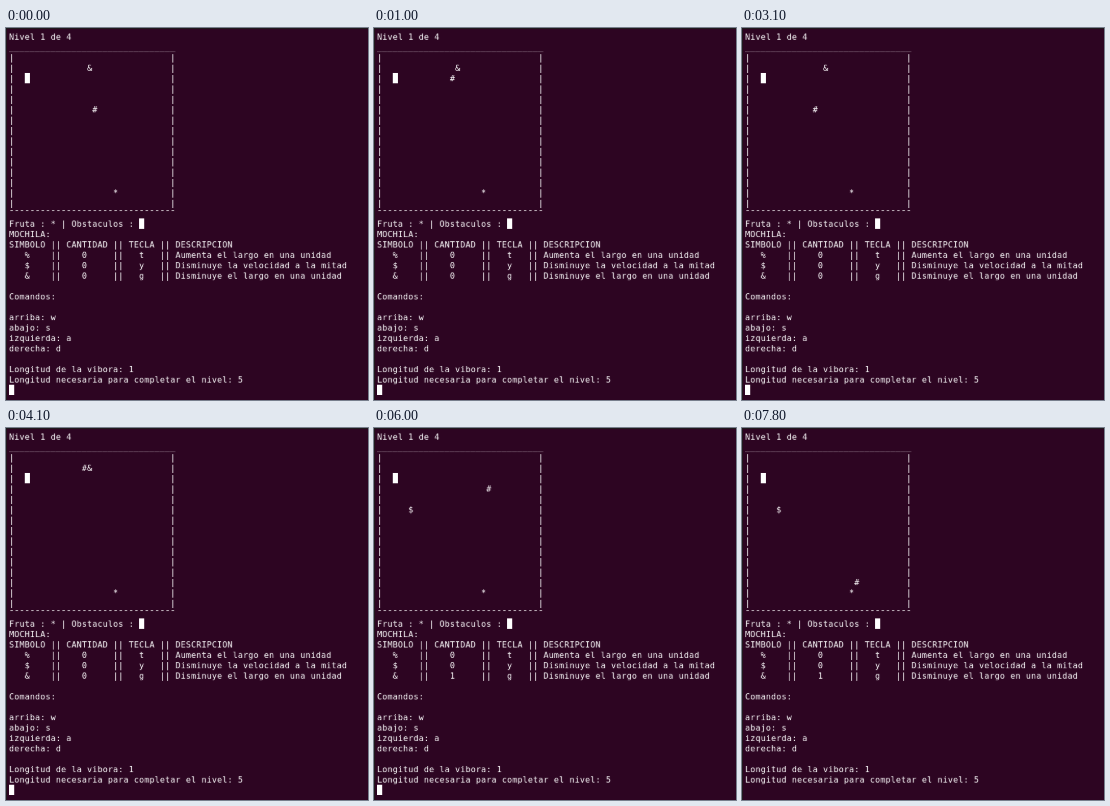
Recreate the animation shown at these times as an HTML page with a canvas. Size 362 by 372 pixels, loop 8 s.

```html
<!DOCTYPE html>
<html lang="es">
<head>
<meta charset="utf-8">
<title>Vibora</title>
<style>
html, body { margin: 0; width: 100%; height: 100%; overflow: hidden; background: #2d0522; }
canvas { display: block; }
</style>
</head>
<body>
<canvas id="stage" width="362" height="372"></canvas>
<script>
const LOOP = 8000;
const COLS = 68, ROWS = 35, CELL_W = 10, CELL_H = 20;
const LEFT = 3.1, TOP = 3.4, ZOOM_X = 0.52, ZOOM_Y = 0.5195;
const EAT_STEP = 21;

const ctx = document.getElementById('stage').getContext('2d');
ctx.imageSmoothingQuality = 'high';

// The terminal is drawn at full size, then shrunk onto the stage
const screen = document.createElement('canvas');
screen.width = COLS * CELL_W;
screen.height = ROWS * CELL_H;
const term = screen.getContext('2d');

// Path of the '#' from its starting cell
const DIRS = { U: [0, -1], D: [0, 1], L: [-1, 0], R: [1, 0] };
const route = 'U'.repeat(3) + 'L'.repeat(6) + 'D'.repeat(3) + 'R'.repeat(4) +
  'U'.repeat(4) + 'R'.repeat(7) + 'D'.repeat(11);
const path = [[16, 7]];
for (const d of route) {
  const [x, y] = path[path.length - 1];
  path.push([x + DIRS[d][0], y + DIRS[d][1]]);
}

// Two steps come 100 ms late
const stepTime = k => 200 * k + (k >= 14 ? 100 : 0) + (k >= 29 ? 100 : 0);

// Times at which the prompt cursor flips, starting visible
const blinks = [100, 700, 1300, 1900, 2500, 2600, 3200, 3300, 3900, 4100,
  4700, 5300, 6200, 6800, 7400];

const bag = [
  ['%', 't', 'Aumenta el largo en una unidad'],
  ['$', 'y', 'Disminuye la velocidad a la mitad'],
  ['&', 'g', 'Disminuye el largo en una unidad']
];
const footer = ['Comandos:', '', 'arriba: w', 'abajo: s', 'izquierda: a', 'derecha: d', '',
  'Longitud de la vibora: 1', 'Longitud necesaria para completar el nivel: 5'];

function text(str, col, row) {
  [...str].forEach((ch, i) => {
    if (ch !== ' ') term.fillText(ch, (col + i) * CELL_W, row * CELL_H + 16);
  });
}

function block(col, row) {
  term.fillRect(col * CELL_W, row * CELL_H, CELL_W, CELL_H);
}

function drawBoard() {
  text('_'.repeat(32), 0, 1);
  for (let row = 2; row <= 16; row++) {
    text('|', 0, row);
    text('|', 31, row);
  }
  text('¯'.repeat(32), 0, 17);
  block(3, 4);
  text('*', 20, 15);
}

function drawInfo(eaten) {
  text('Nivel 1 de 4', 0, 0);
  text('Fruta : * | Obstaculos :', 0, 18);
  block(25, 18);
  text('MOCHILA:', 0, 19);
  text('SIMBOLO || CANTIDAD || TECLA || DESCRIPCION', 0, 20);
  bag.forEach(([symbol, key, note], i) => {
    const count = eaten && symbol === '&' ? 1 : 0;
    text(`   ${symbol}    ||    ${count}     ||   ${key}   || ${note}`, 0, 21 + i);
  });
  footer.forEach((line, i) => text(line, 0, 25 + i));
}

function draw(t) {
  let step = 0;
  while (step < route.length && stepTime(step + 1) <= t) step++;
  const eaten = step >= EAT_STEP;

  term.clearRect(0, 0, screen.width, screen.height);
  term.fillStyle = '#fff';
  term.font = '16px "DejaVu Sans Mono", monospace';
  drawBoard();
  drawInfo(eaten);
  if (eaten) text('$', 6, 7);
  else text('&', 15, 3);
  text('#', ...path[step]);
  if (blinks.filter(b => b <= t).length % 2 === 0) block(0, 34);

  // Window edge along the top and left
  ctx.fillStyle = '#211a1e';
  ctx.fillRect(0, 0, 362, 372);
  ctx.fillStyle = '#2d0522';
  ctx.fillRect(1, 1, 361, 371);
  ctx.drawImage(screen, LEFT, TOP, screen.width * ZOOM_X, screen.height * ZOOM_Y);
}

const start = performance.now();
function tick() {
  draw((performance.now() - start) % LOOP);
  requestAnimationFrame(tick);
}
tick();
</script>
</body>
</html>
```
